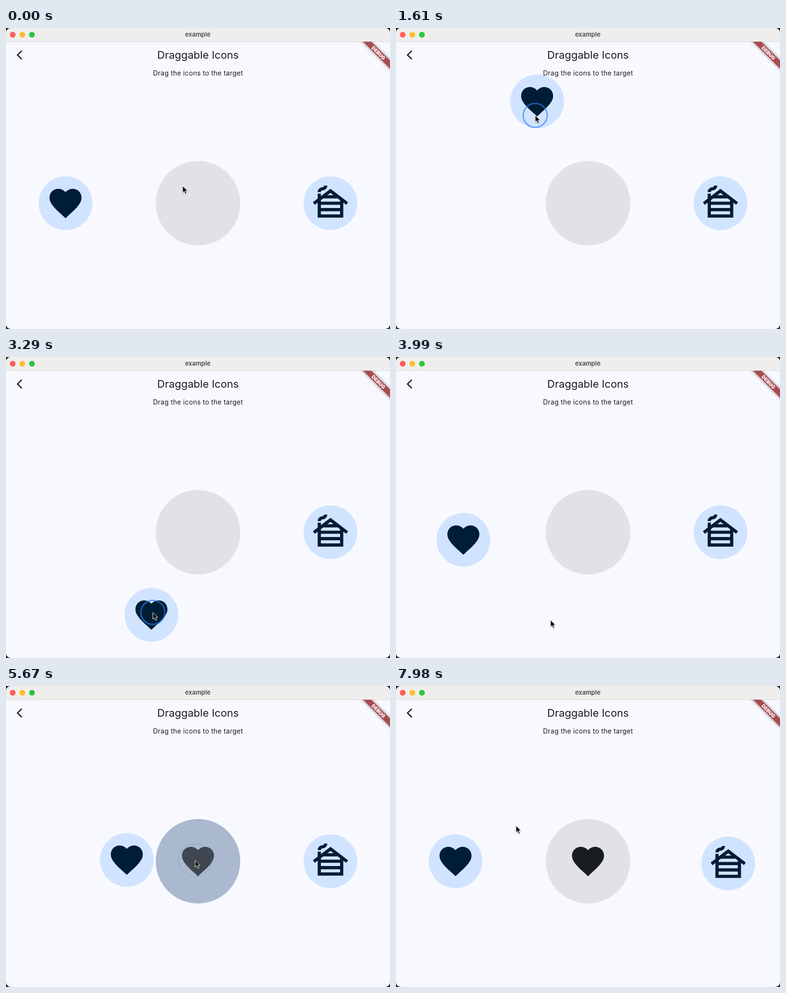
Recreate the animation shown at these times as an HTML page. Size 800 px wide and 627 px high, loop 8000 ms.

```html
<!DOCTYPE html>
<html lang="en">
<head>
<meta charset="utf-8">
<title>Draggable Icons</title>
<style>
  html, body { margin: 0; width: 100%; height: 100%; overflow: hidden; background: #20221e; }
  svg { display: block; width: 100vw; height: 100vh; }
  text { font-family: Inter, sans-serif; text-anchor: middle; }
</style>
</head>
<body>
<svg viewBox="0 0 800 627">
  <defs>
    <path id="heart" transform="translate(-40 -40) scale(3.3333)" d="M12 21.35l-1.45-1.32C5.4 15.36 2 12.28 2 8.5 2 5.42 4.42 3 7.5 3c1.74 0 3.41.81 4.5 2.09C13.09 3.81 14.76 3 16.5 3 19.58 3 22 5.42 22 8.5c0 3.78-3.4 6.86-8.55 11.54z"/>
    <path id="cabin" transform="translate(-40 -40) scale(3.3333)" d="M10 1c0 1.66-1.34 3-3 3-.55 0-1 .45-1 1H4c0-1.66 1.34-3 3-3 .55 0 1-.45 1-1zM12 3L6 7.58V6H4v3.11L1 11.4l1.21 1.59L4 11.62V21h16v-9.38l1.79 1.36L23 11.4zm1.94 4h-3.89L12 5.52zm-6.5 2h9.12L18 10.1v.9H6v-.9zM18 13v2H6v-2zM6 19v-2h12v2z"/>
    <clipPath id="window"><rect width="800" height="627" rx="10"/></clipPath>
    <clipPath id="page"><rect y="28.5" width="800" height="599"/></clipPath>
    <filter id="shadow" x="-30%" y="-100%" width="160%" height="300%">
      <feDropShadow dx="0" dy="0" stdDeviation="3" flood-color="#000" flood-opacity=".5"/>
    </filter>
    <filter id="soft" x="-50%" y="-50%" width="200%" height="200%">
      <feDropShadow dx="0" dy="1" stdDeviation="1" flood-color="#000" flood-opacity=".35"/>
    </filter>
  </defs>

  <g clip-path="url(#window)">
    <rect width="800" height="627" fill="#f8f9ff"/>
    <rect width="800" height="28" fill="#f0eeed"/>
    <rect y="28" width="800" height="1" fill="#dcdbdc"/>
    <circle cx="14" cy="14" r="6" fill="#ff5f57"/>
    <circle cx="34" cy="14" r="6" fill="#febc2e"/>
    <circle cx="54" cy="14" r="6" fill="#28c840"/>
    <text x="399.5" y="18.3" font-size="13" font-weight="600" fill="#4a4949">example</text>

    <path d="M33 47.3L24 56.2L33 65.1" fill="none" stroke="#191c20" stroke-width="2.6"/>
    <text x="400" y="64" font-size="22" fill="#191c20">Draggable Icons</text>
    <text x="400" y="99" font-size="14" letter-spacing=".25" fill="#191c20">Drag the icons to the target</text>

    <circle id="target" cx="400" cy="365" r="88"/>
    <g id="dropped" transform="translate(400 365)" fill="#191c20"><use href="#heart"/></g>
    <g id="heartItem" fill="#001d36"><circle r="56" fill="#d1e4ff"/><use href="#heart"/></g>
    <g id="cabinItem" fill="#001d36"><circle r="56" fill="#d1e4ff"/><use href="#cabin"/></g>

    <g clip-path="url(#page)">
      <g transform="translate(800 28) rotate(45)">
        <rect x="-60" y="28" width="120" height="12" fill="#a94b4f" filter="url(#shadow)"/>
        <text y="37.7" font-size="10.2" font-weight="900" fill="#fff">DEBUG</text>
      </g>
    </g>

    <circle id="ring" fill="none" stroke="#2f80ed" stroke-width="3"/>
    <path id="arrow" d="M0 0V14.2L3.2 11.3L5.6 16.6L8.2 15.5L5.8 10.3H10.2Z" fill="#000" stroke="#fff" stroke-width="1" filter="url(#soft)"/>
    <g id="hand" stroke="#000" stroke-linejoin="round" filter="url(#soft)">
      <path fill="#fff" d="M-3.5 7.5C-4 5-7.5 2-7.5 .2C-7.5-1.4-5.5-1-4.3 1L-5.8-4C-6.2-6-4.2-6.5-3.4-4.6L-2.2-1.3L-2.8-6C-2.8-8-.6-8-.2-6.2L.3-1.6L1-6C1.4-7.7 3.3-7.4 3.1-5.6L2.8-1.2L4.4-4.2C5.3-5.7 7-4.9 6.5-3.3C5.2 .5 6.4 2.5 3.9 7.5Z"/>
      <path fill="none" stroke-width=".9" d="M-1.2 1V5M.9 1V5M3 1V5"/>
    </g>
  </g>
</svg>
<script>
const DURATION = 8000, STEP = 70;
const $ = id => document.getElementById(id);
const clamp = v => Math.max(0, Math.min(1, v));
const move = (el, [x, y]) => el.setAttribute("transform", `translate(${x} ${y})`);

// Pointer path: time, x, y
const path = [
  [0, 368, 329], [70, 368, 329], [350, 116, 386], [560, 116, 386], [700, 120, 394], [840, 120, 394],
  [1190, 138, 272], [1400, 185, 212], [1610, 290, 182], [1720, 322, 180], [1800, 322, 180],
  [2380, 127, 360], [2560, 127, 360], [3290, 306, 532], [3500, 322, 548], [4130, 322, 548],
  [4620, 120, 369], [4760, 120, 369], [5390, 394, 363], [6300, 394, 363],
  [6680, 575, 550], [7070, 675, 419], [7200, 675, 419], [7800, 250, 291], [8000, 250, 291]
];

const homes = { heart: [124, 365], cabin: [676, 365] };
const drags = [
  { item: "heart", press: 770, release: 1720 },
  { item: "heart", press: 2545, release: 3900 },
  { item: "heart", press: 4725, release: 5617 },
  { item: "cabin", press: 7175, release: 7875 }
];
const hovers = [[5080, 5617], [7450, 7650]];
const DROP_TIME = 5617;

// Smooth curve through the pointer path that comes to rest at every pause
function slope(i, axis) {
  const a = path[i - 1], b = path[i], c = path[i + 1];
  if (!a || !c) return 0;
  const still = (p, q) => p[1] === q[1] && p[2] === q[2];
  return still(a, b) || still(b, c) ? 0 : (c[axis] - a[axis]) / (c[0] - a[0]);
}

function pointer(t) {
  const i = Math.max(0, path.findIndex(p => p[0] > t) - 1);
  const a = path[i], b = path[i + 1], span = b[0] - a[0], u = (t - a[0]) / span;
  return [1, 2].map(k =>
    a[k] * (1 + 2 * u) * (1 - u) ** 2 + b[k] * u * u * (3 - 2 * u) +
    span * (slope(i, k) * u * (1 - u) ** 2 + slope(i + 1, k) * u * u * (u - 1)));
}

// Follows the pointer while held, then springs home elastically
function itemPosition(name, t) {
  const drag = drags.filter(d => d.item === name && d.press <= t).pop();
  if (!drag) return homes[name];
  const from = pointer(drag.press), to = pointer(Math.min(t, drag.release));
  const s = Math.max(0, t - drag.release) / 1000;
  const left = s >= 1 ? 0 : 2 ** (-10 * s) * Math.cos(5 * Math.PI * s);
  return homes[name].map((h, i) => h + (to[i] - from[i]) * left);
}

function drawRing(t) {
  const drag = drags.find(d => t >= d.press && t < d.release + 80);
  $("ring").style.display = drag ? "" : "none";
  if (!drag) return;
  const fade = clamp((t - drag.release) / 80);
  move($("ring"), pointer(Math.min(t, drag.release)));
  $("ring").setAttribute("r", 25 + 14 * fade);
  $("ring").setAttribute("stroke-width", 3 - 2 * fade);
  $("ring").setAttribute("opacity", 0.62 * (1 - fade));
}

function draw(t) {
  const heart = itemPosition("heart", t), cabin = itemPosition("cabin", t), tip = pointer(t);
  move($("heartItem"), heart);
  move($("cabinItem"), cabin);

  const tint = Math.max(...hovers.map(([on, off]) =>
    Math.min(clamp((t - on) / 200), clamp(1 - (t - off) / 200))));
  const mix = (a, b) => a + (b - a) * tint;
  $("target").setAttribute("fill", `rgb(${mix(225, 151)}, ${mix(226, 170)}, ${mix(231, 197)})`);
  $("dropped").setAttribute("opacity", clamp((t - DROP_TIME) / 73));

  const held = drags.some(d => t >= d.press && t < d.release);
  const over = [heart, cabin].some(([x, y]) => Math.hypot(x - tip[0], y - tip[1]) < 56);
  const grab = over && !held;
  $("hand").style.display = grab ? "" : "none";
  $("arrow").style.display = grab ? "none" : "";
  move(grab ? $("hand") : $("arrow"), tip);
  drawRing(t);
}

const start = performance.now();
function frame() {
  const t = (performance.now() - start) % DURATION;
  draw(Math.floor(t / STEP) * STEP);
  requestAnimationFrame(frame);
}
frame();
</script>
</body>
</html>
```
